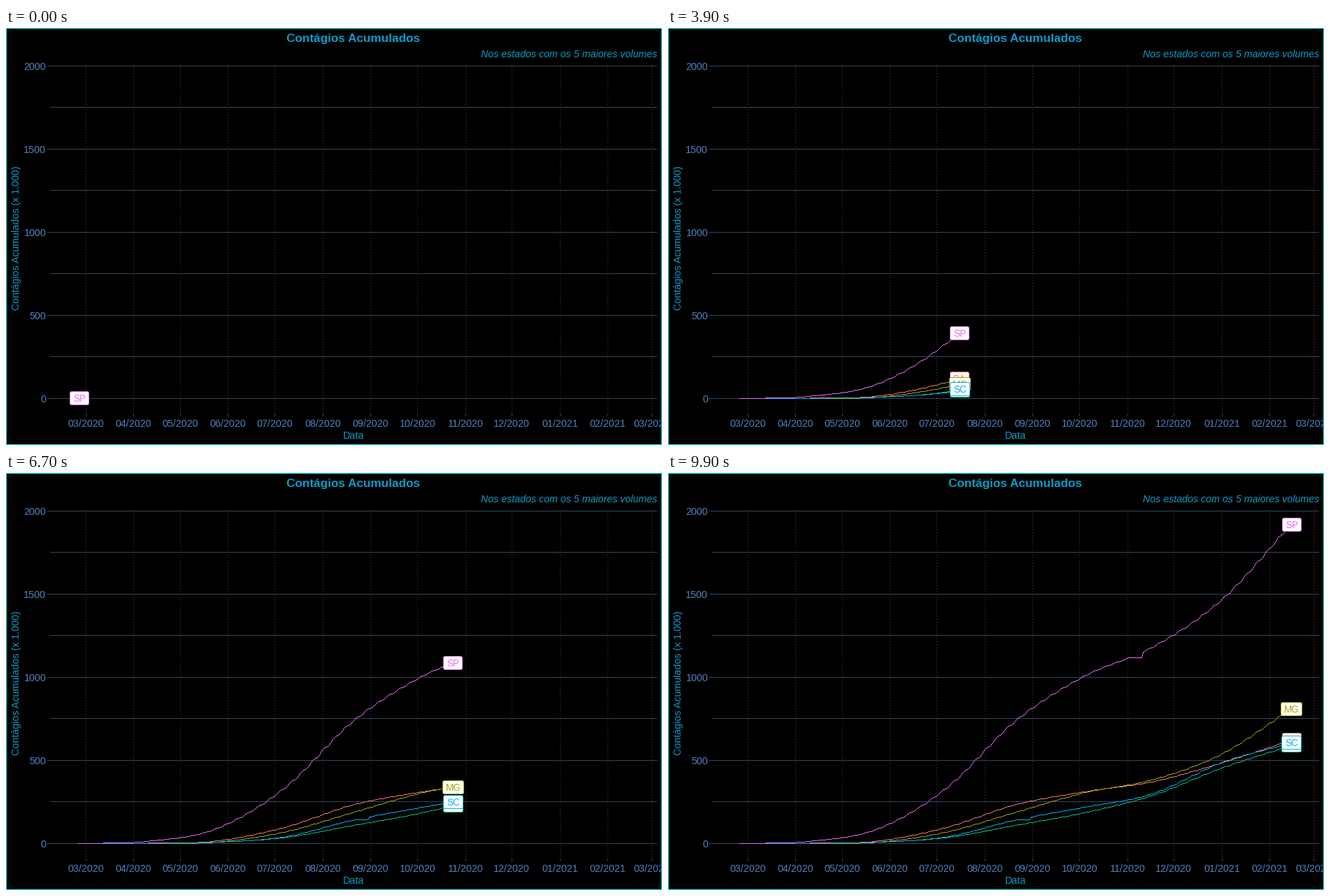
These frames come from a looping animation (938x597 px, 10 s). A matplotlib script:

```python
import numpy as np
import matplotlib.pyplot as plt
from matplotlib.animation import FuncAnimation
from matplotlib.patches import FancyBboxPatch, Rectangle

W, H, DPI = 938, 597, 100
FRAMES, INTERVAL = 100, 100
PX = 72 / DPI                       # one pixel in points
DAY = 809 / 365                     # pixels per day
X0 = 102.9                          # 25 Feb 2020
LAST_DAY = 355
DAYS_PER_FRAME = 3.603
LEFT, RIGHT, TOP, BOTTOM = 63, 930, 50, 553
GRID, TICK_TEXT, TITLE = "#33475b", "#4f81bd", "#0c9cc8"

plt.rcParams["font.family"] = "Liberation Sans"
fig = plt.figure(figsize=(W / DPI, H / DPI), dpi=DPI, facecolor="black")
ax = fig.add_axes([0, 0, 1, 1])
# A quarter pixel of offset makes snapping pick the intended pixel
ax.set(xlim=(-0.25, W - 0.25), ylim=(H - 0.25, -0.25))
ax.axis("off")


def text(x, y, s, size, color, ha="center", **kw):
    kw.setdefault("va", "baseline")
    return ax.text(x, y, s, fontsize=size * PX, color=color, ha=ha, **kw)


def rule(xs, ys, **kw):
    ax.plot(xs, ys, color=GRID, lw=PX, solid_capstyle="projecting",
            dash_capstyle="butt", zorder=1, **kw)


def level(total):
    return 530 - 0.238 * total


# Frame, grid and axes
ax.add_patch(Rectangle((0, 0), W - 1, H - 1, fill=False, ec="#00ffff", lw=PX))
for total in range(0, 2001, 250):
    y = int(level(total) + 0.1)
    major = total % 500 == 0
    rule([LEFT - 4 if major else LEFT, RIGHT], [y, y])
    if major:
        text(57, y + 5.5, str(total), 14.4, TICK_TEXT, ha="right")

first = np.datetime64("2020-03-01")
for month in np.arange("2020-03", "2021-04", dtype="datetime64[M]"):
    x = int(114 + DAY * (month.astype("datetime64[D]") - first).astype(int))
    rule([x, x], [BOTTOM, TOP], linestyle=(0.5, (1, 3)))
    rule([x, x], [BOTTOM - 1, BOTTOM + 2])
    year, number = str(month).split("-")
    text(x, 571, f"{number}/{year}", 14.2, TICK_TEXT)

text(496, 20, "Contágios Acumulados", 17.15, TITLE, weight="bold")
text(931, 42, "Nos estados com os 5 maiores volumes", 14.27, TITLE,
     ha="right", style="italic")
text(496.5, 588, "Data", 14.2, TITLE)
text(22, 300.7, "Contágios Acumulados (x 1.000)", 14.25, TITLE,
     rotation=90, va="center", ha="right")


def smooth(knots, t):
    """Cubic curve through evenly spaced knots, t counted in knots."""
    p = np.array(knots, float)
    m = np.gradient(p)
    k = np.clip(t.astype(int), 0, len(p) - 2)
    u = t - k
    return (p[k] * (1 + 2 * u) * (1 - u) ** 2 + m[k] * u * (1 - u) ** 2
            + p[k + 1] * u ** 2 * (3 - 2 * u) + m[k + 1] * u ** 2 * (u - 1))


def cumulative(knots, hold=None):
    """Daily totals; reports slow down every Monday and stop during hold."""
    days = np.arange(LAST_DAY + 1)
    t = days - 0.6 * 7 / (2 * np.pi) * np.sin(2 * np.pi * (days - 6) / 7)
    t = np.clip(t, 0, LAST_DAY) * (len(knots) - 1) / LAST_DAY
    totals = smooth(knots, t)
    if hold:
        totals[hold[0]:hold[1]] = totals[hold[0]]
    return totals


class State:
    def __init__(self, name, color, start, width, order, knots, hold=None):
        self.start, self.width = start, width
        self.ys = level(cumulative(knots, hold))
        self.curve = ax.stairs([0], [0, 1], baseline=[0], fill=True,
                               color=color, lw=0, snap=True, zorder=3 + order)
        self.box = FancyBboxPatch((0, 0), 1, 1, fc="white", ec=color, lw=PX,
                                  boxstyle="round,pad=0,rounding_size=2.5",
                                  zorder=20 + order)
        ax.add_patch(self.box)
        self.tag = text(0, 0, name, 13.5, color, zorder=20 + order)

    def draw_curve(self, day):
        """One-pixel line without smoothing, as a run of rows per column."""
        xs = X0 + DAY * np.arange(self.start, day + 1)
        ys = self.ys[self.start:day + 1]
        cols = np.arange(int(xs[0]), int(xs[-1]) + 1)
        before, mid, after = (np.interp(cols + d, xs, ys)
                              for d in (-0.5, 0, 0.5))
        row = np.round(mid)
        top = np.minimum(row, np.ceil(after))
        bottom = np.maximum(row, np.floor(before)) + 1
        self.curve.set_data(top, np.append(cols, cols[-1] + 1), bottom)

    def show(self, day):
        visible = day >= self.start
        for artist in (self.curve, self.box, self.tag):
            artist.set_visible(visible)
        if not visible:
            return
        self.draw_curve(day)
        left = round(X0 + DAY * day + 1.5 - self.width / 2) + 0.25
        top = round(self.ys[day] - 10) + 0.25
        self.box.set_bounds(left, top, self.width, 19)
        self.tag.set_position((left + self.width / 2, top + 14.75))


# Totals in thousands at nine evenly spaced dates
states = [
    State("BA", "#f8766d", 10, 27, 0,
          [0, 2, 15, 97, 233, 311, 372, 485, 620]),
    State("MG", "#a3a500", 12, 30, 1,
          [0, 1, 8, 69, 187, 305, 384, 538, 807]),
    State("RS", "#00bf7d", 14, 28, 2,
          [0, 1, 8, 36, 109, 185, 290, 454, 588]),
    State("SC", "#00b0f6", 16, 28, 3,
          [0, 1, 8, 40, 141, 218, 300, 487, 603], hold=(178, 188)),
    State("SP", "#e76bf3", 0, 27, 4,
          [0, 13, 88, 334, 737, 1006, 1183, 1466, 1916], hold=(250, 260)),
]


def update(i):
    day = min(round(DAYS_PER_FRAME * i), LAST_DAY)
    for state in states:
        state.show(day)
    return []


anim = FuncAnimation(fig, update, frames=FRAMES, interval=INTERVAL,
                     repeat=True, repeat_delay=0, blit=False)
plt.show()
```
